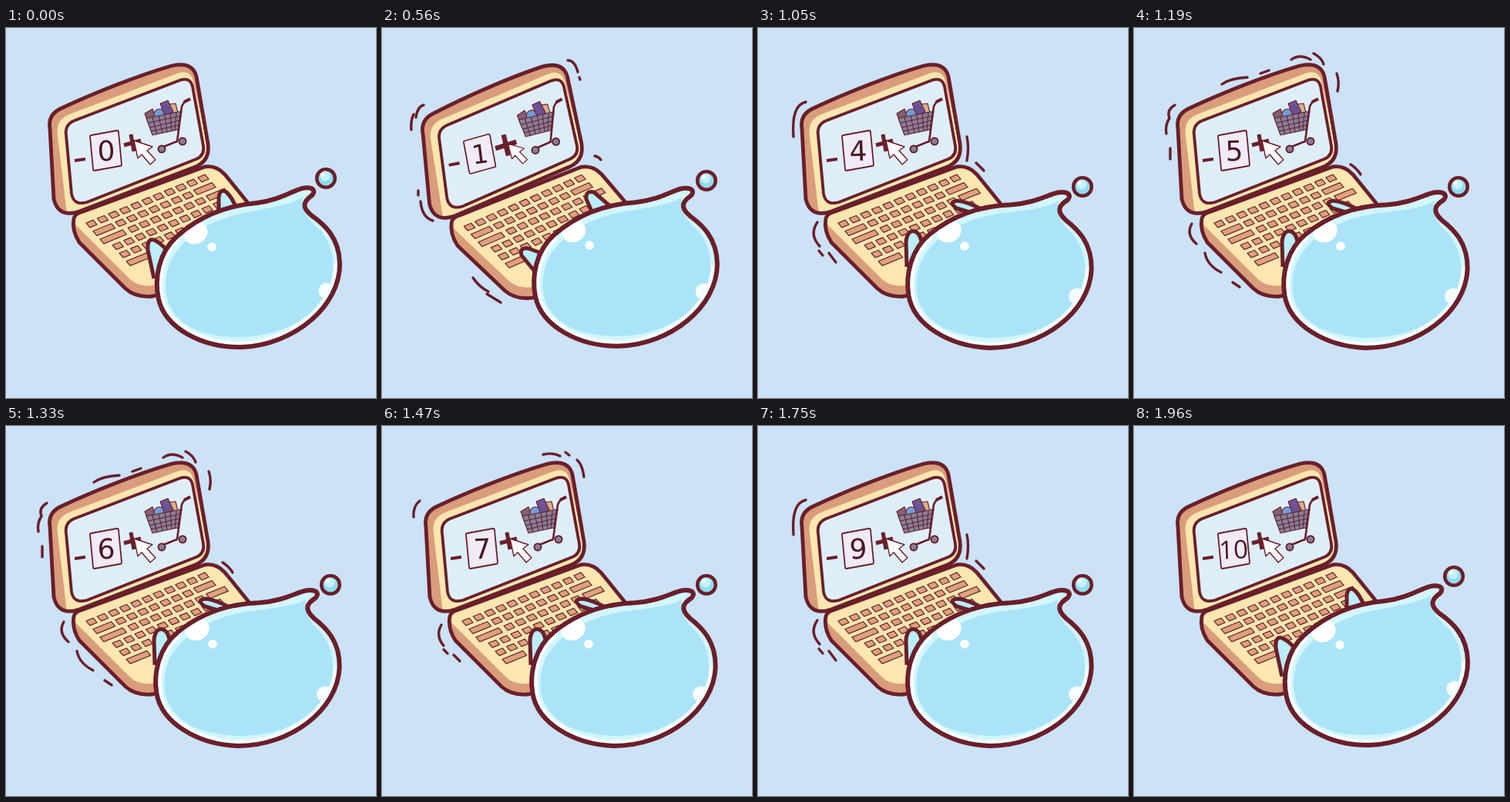
These frames come from a looping animation (480 by 480 pixels, 2.52 s). An HTML page:

```html
<!DOCTYPE html>
<html lang="en">
<head>
<meta charset="utf-8">
<title>Slime shopping</title>
<style>
  html, body { margin: 0; width: 100%; height: 100%; overflow: hidden; background: #cce2f7; }
  svg { display: block; width: 100%; height: 100%; }
  .ink { stroke: #6a1f2b; stroke-linejoin: round; }
  .line { fill: none; }
  .round { stroke-linecap: round; }
  text { fill: #4a1822; text-anchor: middle; }
</style>
</head>
<body>
<svg viewBox="0 0 480 480">
  <defs>
    <path id="shape" d="M396 208C380 203 365 222 325 227C280 231 245 249 221 271C198 292 192 325 198 352C207 390 255 415 306 414C375 411 434 360 433 305C432 271 412 254 396 243C383 232 386 225 397 217Q402 211 396 208Z"/>
    <path id="lidShape" d="M57 131Q54 113 70 105C110 86 170 62 215 49Q242 43 247 63L262 150Q265 172 246 180L95 238Q68 247 62 222Z"/>
    <path id="baseShape" d="M88 247Q85 262 95 278L155 338Q168 350 190 348L230 338L318 232L284 190Q273 178 258 180L100 238Q89 241 88 247Z"/>
    <clipPath id="inBody"><use href="#shape"/></clipPath>
    <clipPath id="inLid"><use href="#lidShape"/></clipPath>
    <clipPath id="inBase"><use href="#baseShape"/></clipPath>
  </defs>

  <path id="marks" class="ink line round" stroke-width="3.4"/>

  <g id="base">
    <use href="#baseShape" fill="#d99d7c"/>
    <path clip-path="url(#inBase)" fill="#fde6b0" d="M86 236L91 256L161 326Q174 338 198 333L240 322L330 240L260 170Z"/>
    <path id="keys" class="ink" fill="#dca27c" stroke-width="1.2"/>
    <use href="#baseShape" class="ink line" stroke-width="4.8"/>
  </g>

  <g id="lid">
    <use href="#lidShape" fill="#d99d7c"/>
    <path clip-path="url(#inLid)" fill="#fde6b0" d="M67 140Q64 119 82 112L222 59Q238 53 243 68L270 190L80 250Z"/>
    <use href="#lidShape" class="ink line" stroke-width="4.8"/>
    <path class="ink" fill="#deeef8" stroke-width="3.8" d="M78 139Q76 125 89 120L225 68Q239 63 242 76L256 153Q258 165 247 170L105 226Q88 231 85 215Z"/>
    <path class="ink line" stroke-width="4" d="M89 172L103 170"/>
    <g id="counter">
      <path class="ink" fill="#f1eaf7" stroke-width="1.8" d="M111 139L144 133Q146 133 146 135L150 177Q150 179 148 179L115 185Q113 185 113 183L109 141Q109 139 111 139Z"/>
      <text id="count" y="172" transform="rotate(-2 130 160)"></text>
    </g>

    <g class="ink" stroke-width="1.1">
      <path fill="#806071" d="M180 111L190 105L196 121L184 122Z"/>
      <path fill="#d5b08d" d="M209 99L220 98L223 110L212 115Z"/>
      <circle cx="199" cy="112" r="7" fill="#6f9edb"/>
      <path fill="#6e5394" d="M200 98L210 94L217 109L206 114Z"/>
      <path fill="#858099" d="M182 117L228 108L223 132L190 139Z"/>
      <path class="line" d="M185 123L227 114M187 129L225 120M188 134L224 126M190 116L196 138M198 114L203 136M206 112L209 135M213 111L215 134M221 110L219 133"/>
      <path class="line" stroke-width="2.6" d="M239 92Q231 94 228 102L222 147L202 155"/>
      <path class="line" stroke-width="4" d="M239 92L231 96"/>
      <circle cx="202" cy="157" r="4.5" fill="#858099" stroke-width="2"/>
      <circle cx="229" cy="147" r="4.5" fill="#858099" stroke-width="2"/>
    </g>

    <path id="plus" class="ink line" stroke-width="5" d="M153 152L175 146M162 138L166 160"/>
    <path id="cursor" class="ink" fill="#fbf7fc" stroke-width="1.4" d="M166 146L171 169L176 164L187 177L194 171L183 159L190 154Z"/>
  </g>

  <path id="hands" class="ink" fill="#baeefa" stroke-width="5"/>
  <g id="body">
    <use href="#shape" fill="#d2f6fd"/>
    <g clip-path="url(#inBody)">
      <path fill="none" stroke="#f4fdff" stroke-width="15" d="M221 271C198 292 192 325 198 352C207 390 255 415 306 414C375 411 434 360 433 305"/>
      <path fill="#abe4f8" d="M385 219C372 228 350 232 318 238C270 246 230 268 212 306C199 345 211 378 252 394C300 409 369 401 404 360C430 329 431 292 409 264C395 250 382 240 385 219Z"/>
      <ellipse cx="246" cy="266" rx="16" ry="14" fill="#fff" transform="rotate(-30 246 266)"/>
      <circle cx="267" cy="284" r="5.8" fill="#fff"/>
      <circle cx="416" cy="341" r="10.5" fill="#f4fdff"/>
    </g>
    <use href="#shape" class="ink line" stroke-width="6"/>
  </g>
  <g id="bubble">
    <circle class="ink" r="11.8" fill="#8fdcf0" stroke-width="4.5"/>
    <circle cx="-1" cy="-3" r="6.5" fill="#c4f1fb"/>
    <circle cx="-4" cy="-5" r="2.6" fill="#fff"/>
  </g>
</svg>
<script>
const $ = id => document.getElementById(id);
const set = (id, attrs) => { for (const a in attrs) $(id).setAttribute(a, attrs[a]); };

// Keyboard: parallelograms on a slanted grid
const at = (col, row) => `${111 + 14.5 * col + 9 * row} ${254 - 5.9 * col + 10.5 * row}`;
const key = (col, row, w = 1) => {
  const l = col - .32, r = col + w - .68, t = row - .28, b = row + .28;
  return `M${at(l, t)}L${at(r, t)}L${at(r, b)}L${at(l, b)}Z`;
};
const run = (from, n, row) => Array.from({ length: n }, (_, i) => key(from + i, row)).join('');
set('keys', { d: run(0, 11, 0) +
  key(0, 1, 2) + run(2, 7, 1) + key(9, 1, 2) +
  key(0, 2, 2.4) + run(2.5, 7, 2) + key(9.5, 2, 2) +
  run(.5, 10, 3) + run(.5, 9, 4) + key(.5, 5, 2.2) });

const pressHands = 'M200 318L181 295Q178 284 190 286L212 294M274 242L265 222Q264 210 275 213L298 233';
const poses = {
  rest: { lid: '', base: '', body: '', bubble: [415, 195],
    hands: 'M192 325L184 288Q183 270 194 276Q202 280 212 292M276 238L276 221Q277 207 286 213Q293 219 300 236' },
  lift: { lid: '', base: '', body: 'rotate(3.1 286 302)', bubble: [421, 206],
    hands: 'M193 310L192 277Q194 261 204 264Q212 268 213 284M285 242L258 234Q246 226 259 224Q270 225 290 235' },
  lean: { lid: 'rotate(-2.2 240 235)', base: 'rotate(-1.5 270 160)', body: 'rotate(1.15 367 400)',
    bubble: [421, 198], hands: pressHands, press: true },
  press: { lid: 'rotate(-4.3 262 222)', base: 'rotate(-4.4 250 214)', body: 'translate(5.5 -5)',
    bubble: [419, 190], hands: pressHands, press: true }
};

const shakes = [
  'M54 100Q46 102 44 116M41 112Q37 120 38 132M241 42Q250 42 254 57M256 64l1 3M276 166Q281 167 284 171M47 211v6M50 225Q52 246 66 250M118 324Q126 336 138 342M136 345L154 356',
  'M209 38Q222 35 232 40M253 64Q259 76 258 91M267 125Q271 140 268 160M46 113Q36 120 34 136M41 179Q42 200 48 214M59 245Q62 257 72 263',
  'M114 73Q125 65 147 64M164 59l11 -4M204 41Q215 33 229 41M233 33Q243 38 246 47M263 59Q267 70 264 82M53 100Q42 106 46 117Q40 126 42 137M47 156v14M281 177Q289 182 294 190M75 254Q67 268 81 280M92 292Q95 308 113 317M128 330l9 6',
  'M209 37Q222 34 231 39M238 34l5 4M253 44Q260 50 262 66M49 97Q40 104 41 118M77 258Q69 272 80 285M80 290l5 5M93 297l8 8',
  'M62 96Q43 100 46 141M271 141Q274 155 271 172M283 175l10 10M77 252Q66 268 80 283M79 289l5 6M92 292l9 12'
];

const zoom = (x, y, s, turn = 0) =>
  `translate(${x} ${y}) rotate(${turn}) scale(${s}) translate(${-x} ${-y})`;

function draw() {
  const time = performance.now() % 2520;
  const tick = Math.floor((time - 560) / 70);
  const busy = tick >= 0 && tick < 20;
  const odd = tick & 1;
  const pose = poses[!busy ? 'rest' : odd ? 'lift' : tick ? 'press' : 'lean'];
  const shake = odd ? 2 + ((tick + 3) >> 2) % 3 : tick && 1 - (tick >> 1 & 1);
  const count = tick < 0 ? 0 : Math.min(10, 1 + (tick >> 1));

  for (const id of ['lid', 'base', 'body']) set(id, { transform: pose[id] });
  set('bubble', { transform: `translate(${pose.bubble})` });
  set('hands', { d: pose.hands });
  set('marks', { d: busy ? shakes[shake] : '' });
  set('counter', { transform: pose.press ? zoom(130, 160, .94, -3) : '' });
  set('plus', { transform: pose.press ? zoom(164, 149, 1.25) : '' });
  set('cursor', { transform: pose.press ? zoom(172, 155, .86) : '' });
  set('count', count < 10
    ? { x: 130, 'font-size': 36, 'font-family': '"DejaVu Sans", sans-serif' }
    : { x: 129, 'font-size': 33, 'font-family': '"Open Sans", sans-serif' });
  $('count').textContent = count;
  requestAnimationFrame(draw);
}
draw();
</script>
</body>
</html>
```
